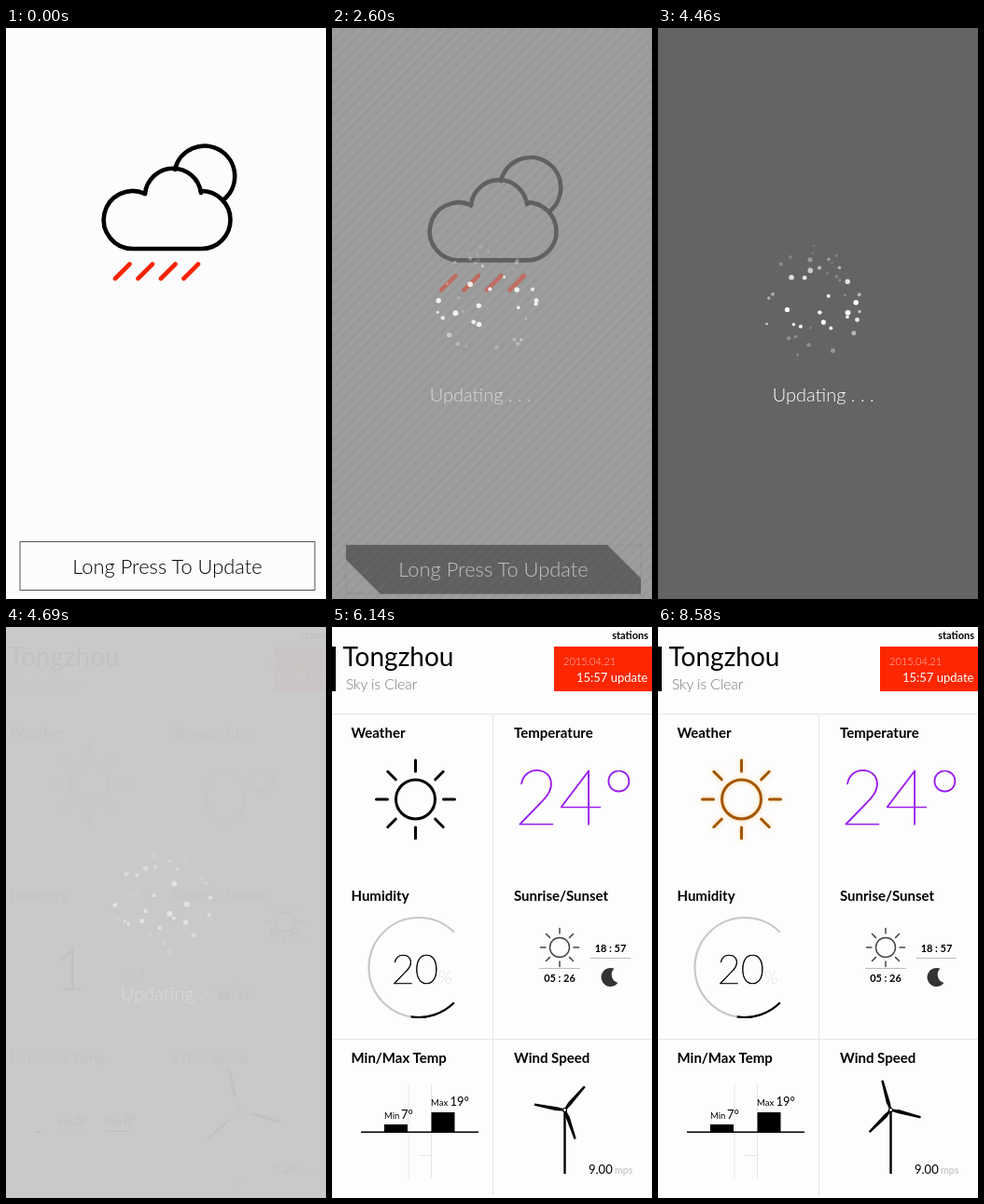
Animation, 343 px wide and 613 px high, one loop 8680 ms. Source, as an HTML page:

```html
<!DOCTYPE html>
<html lang="en">
<head>
<meta charset="utf-8">
<title>Weather update</title>
<style>
html, body { margin: 0; width: 100%; height: 100%; overflow: hidden; background: #fcfcfc; }
svg { display: block; width: 100vw; height: 100vh; font-family: Lato, "Open Sans", sans-serif; }
text { white-space: pre; }
.bold { font-weight: 700; }
.light { font-weight: 300; }
.thin { font-weight: 100; }
.line { fill: none; stroke-linecap: round; }
.rule { stroke: #e6e6e6; stroke-width: 1; }
.mid { text-anchor: middle; }
</style>
</head>
<body>
<svg viewBox="0 0 343 613">
  <defs>
    <pattern id="hatch" width="8" height="8" patternUnits="userSpaceOnUse" patternTransform="rotate(45)">
      <rect width="4" height="8"/>
    </pattern>
    <clipPath id="btnClip"><rect x="15" y="551" width="316" height="53"/></clipPath>
    <clipPath id="riseClip"><rect id="riseBox" x="215" y="300" width="60" height="66"/></clipPath>
    <clipPath id="setClip"><rect id="setBox" x="275" y="300" width="50" height="55"/></clipPath>
    <clipPath id="moonClip"><rect id="moonBox" x="275" y="355" width="50" height="60"/></clipPath>
    <g id="smallSun" class="line" stroke="#444" stroke-width="1.5"><circle r="10.5"/></g>
  </defs>

  <rect id="back" width="343" height="613"/>
  <rect id="stripes" width="343" height="613" fill="url(#hatch)"/>

  <g id="home">
    <g id="cloud" class="line" stroke="#000" stroke-width="4.6">
      <path d="M181 152A32.5 32.5 0 1 1 233 184.5"/>
      <path d="M149 178A31 31 0 1 0 136 237H210A31 31 0 0 0 209 175"/>
      <path d="M149 178A30.2 30.2 0 0 1 209 177"/>
      <path stroke="#f52300" d="M117 269l15.5-15.5M141.5 269l15.5-15.5M166 269l15.5-15.5M190.5 269l15.5-15.5"/>
    </g>
    <g id="button">
      <rect id="frame" x="15" y="551.5" width="316" height="52" fill="none" stroke="#555"/>
      <path id="band" clip-path="url(#btnClip)"/>
      <text id="press" class="light mid" x="173" y="585.5" font-size="21.9">Long Press To Update</text>
    </g>
  </g>

  <g id="loader" fill="#fff">
    <g id="dots"></g>
    <text id="updating" class="light" y="401.3" font-size="20"></text>
  </g>

  <g id="board">
    <g id="rules" class="rule">
      <path d="M0 93.5H343M172.5 93.5V610M172 442.5H343"/>
    </g>
    <path id="leftRule" class="rule" d="M0 442.5H173"/>
    <g id="head">
      <rect y="21" width="4" height="48"/>
      <text x="11.5" y="41.5" font-size="28">Tongzhou</text>
      <text class="light" x="15" y="67" font-size="15.5" fill="#777">Sky is Clear</text>
    </g>
    <text id="stations" class="bold" x="339" y="13" font-size="11" text-anchor="end">stations</text>
    <g id="panel">
      <rect id="panelBox" x="238" y="21" width="110" height="48" fill="#fc2600"/>
      <g id="panelText">
        <text class="light" x="248" y="41" font-size="11" fill="#ffc4b8">2015.04.21</text>
        <text x="262" y="59" font-size="13" fill="#fff">15:57 update</text>
      </g>
    </g>
    <g id="labels" class="bold" font-size="15">
      <text x="20.5" y="119">Weather</text><text x="195" y="119">Temperature</text>
      <text x="20.5" y="294">Humidity</text><text x="195" y="294">Sunrise/Sunset</text>
      <text x="20.5" y="468">Min/Max Temp</text><text x="195" y="468">Wind Speed</text>
    </g>

    <g id="sun" class="line" stroke-width="3"><circle r="21"/></g>
    <text id="temp" class="thin" x="195.5" y="212" font-size="82" fill="#9a1ff0" stroke="#9a1ff0" stroke-width="0.9"></text>

    <g id="dial" class="line" stroke-width="2.2" style="stroke-linecap:butt">
      <path id="ring" stroke="#c8c8c8"/><path id="arc" stroke="#000"/>
    </g>
    <g id="humid">
      <text id="humNum" class="thin" x="63.5" y="383" font-size="43.5" stroke="#000" stroke-width="0.7"></text>
      <text class="thin" x="114" y="383" font-size="19" fill="#999">%</text>
    </g>

    <g id="twilight">
      <g clip-path="url(#riseClip)"><use id="riseSun" href="#smallSun"/></g>
      <g clip-path="url(#setClip)"><use id="setSun" href="#smallSun"/></g>
      <g clip-path="url(#moonClip)">
        <path id="moon" fill="#333" d="M4-9.2A10 10 0 1 0 8 6A9 9 0 0 1 4-9.2Z"/>
      </g>
      <g id="rise">
        <path d="M222 366.5H266" stroke="#bbb"/>
        <text class="bold mid" x="244" y="381" font-size="11">05 : 26</text>
      </g>
      <g id="set">
        <path d="M277 355.5H320" stroke="#bbb"/>
        <text class="bold mid" x="298.5" y="348.5" font-size="11">18 : 57</text>
      </g>
    </g>

    <path id="guide1" class="rule" d="M82 491V592"/>
    <path id="guide2" class="rule" d="M106.5 491V592"/>
    <path id="tick" class="rule" d="M93 567.5H106"/>
    <g id="bars">
      <rect id="minBar" x="56" width="25"/><rect id="maxBar" x="106.5" width="25"/>
      <path id="base" stroke="#000" stroke-width="1.5"/>
      <g id="minText"><text x="56" font-size="9.5">Min</text><text id="minNum" x="74" font-size="13"></text></g>
      <g id="maxText"><text x="106" font-size="9.5">Max</text><text id="maxNum" x="126.5" font-size="13"></text></g>
    </g>

    <g id="wind">
      <path id="tower" stroke="#000" stroke-width="2.4"/>
      <g id="blades"></g>
      <circle cx="249.5" cy="518.5" r="2" fill="#fff" stroke="#000" stroke-width="1.2"/>
      <g id="speed">
        <text id="speedNum" x="275" y="587" font-size="13"></text>
        <text class="bold" x="303" y="587" font-size="10.5" fill="#ccc">mps</text>
      </g>
    </g>
  </g>
</svg>
<script>
const LOOP = 8680;
const el = {};
document.querySelectorAll('[id]').forEach(n => el[n.id] = n);

const clamp = x => Math.max(0, Math.min(1, x));
const span = (t, from, length) => clamp((t - from) / length);
const easeOut = (x, power = 2) => 1 - Math.pow(1 - x, power);
const set = (name, attrs) => { for (const k in attrs) el[name].setAttribute(k, attrs[k]); };
const move = (name, x, y, extra = '') => set(name, { transform: `translate(${x} ${y})${extra}` });
const show = (names, value) => names.split(' ').forEach(n => set(n, { opacity: value }));
const write = (name, value) => { if (el[name].textContent !== value) el[name].textContent = value; };

function add(parent, tag, attrs) {
  const node = document.createElementNS('http://www.w3.org/2000/svg', tag);
  for (const k in attrs) node.setAttribute(k, attrs[k]);
  return el[parent].appendChild(node);
}

// CSS "ease" curve, solved by bisection
function ease(x) {
  let lo = 0, hi = 1, s = 0.5;
  const curve = (a, b) => 3 * a * s * (1 - s) ** 2 + 3 * b * s * s * (1 - s) + s ** 3;
  for (let i = 0; i < 18; i++) {
    s = (lo + hi) / 2;
    if (curve(0.25, 0.25) < x) lo = s; else hi = s;
  }
  return curve(0.1, 1);
}

function addRays(parent, inner, outer) {
  for (let i = 0; i < 8; i++) add(parent, 'path', { d: `M${inner} 0H${outer}`, transform: `rotate(${i * 45})` });
}
addRays('sun', 30, 42);
addRays('smallSun', 15, 20.5);

const blades = [0, 120, 240].map(turn => ({
  turn,
  node: add('blades', 'path', { d: 'M0-1L9-2.4L33-1.2V1.2L9 1.6L0 1Z' })
}));

let seed = 29;
const random = () => (seed = (seed * 16807) % 2147483647) / 2147483647;
const dots = Array.from({ length: 42 }, () => ({
  height: random() * 2 - 1,
  angle: random() * Math.PI * 2,
  speed: 0.0018 + random() * 0.0012,
  size: 1.4 + random() * 1.2,
  node: add('dots', 'circle', {})
}));

function arcPath(start, sweep) {
  const at = deg => {
    const a = deg * Math.PI / 180;
    return `${93 + 53.5 * Math.cos(a)} ${365.5 + 53.5 * Math.sin(a)}`;
  };
  return `M${at(start)}A53.5 53.5 0 ${sweep > 180 ? 1 : 0} 1 ${at(start + sweep)}`;
}

function drawHome(t, out) {
  const fill = easeOut(span(t, 1630, 600));
  const half = 148 * fill, left = 147 - half, right = 147 + half;
  set('band', { d: `M${left} 551H${right}l53 53H${left + 53}Z`, opacity: fill });
  show('frame', 1 - 0.7 * fill);
  const tone = Math.round(255 * fill);
  set('press', { fill: `rgb(${tone},${tone},${tone})` });
  move('cloud', 0, 20 * out);
  move('button', 0, 6 * out);
  show('home', 1 - out);
}

function drawLoader(t, enter, leave) {
  const alpha = enter * (1 - leave);
  show('updating', alpha);
  show('dots', clamp(alpha * 1.4));
  if (!alpha) return;
  for (const d of dots) {
    const a = d.angle + d.speed * t, r = Math.sqrt(1 - d.height ** 2);
    const depth = (Math.sin(a) * r + 1) / 2;
    const y = d.height * 0.95 + 0.15 * Math.sin(a);
    d.node.setAttribute('cx', 166 + 54 * r * Math.cos(a));
    d.node.setAttribute('cy', 295 + 58 * y);
    d.node.setAttribute('r', d.size * (0.7 + 0.5 * depth));
    d.node.setAttribute('opacity', clamp((0.2 + depth) * (1.25 - Math.abs(y))));
  }
  const count = 1 + Math.floor(((t - 2600 + 775) % 930) / 310);
  write('updating', 'Updating' + ' .'.repeat(count));
  set('updating', { x: 122.7 - 47 * (1 - enter) });
}

function drawSun(t, rest) {
  const phase = ((t + 3860) % 2000) / 1000;
  const heat = phase < 1 ? ease(phase) : 1 - ease(phase - 1);
  move('sun', 89.5, 185 - 17 * rest);
  set('sun', { stroke: `rgb(${220 * heat | 0},${118 * heat | 0},0)` });
  el.sun.style.filter = heat > 0.01 ? `drop-shadow(0 0 2.5px rgba(255,165,40,${0.7 * heat}))` : 'none';
}

function drawTwilight(p, rest) {
  const riseY = 366 + 20 * rest, setY = 355 - 17 * rest;
  set('riseBox', { height: riseY - 300 });
  set('setBox', { height: setY - 300 });
  set('moonBox', { y: setY });
  move('riseSun', 244, riseY - 22 + 39 * rest);
  move('setSun', 298.5, setY - 22 + 62 * p * p);
  move('moon', 298.5, setY + 21 - 38 * rest, ` rotate(${-100 * rest})`);
  move('rise', 0, 20 * rest);
  move('set', 0, -17 * rest);
}

function drawBars(q, rest) {
  const grow = easeOut(q, 3), low = 8 * grow, high = 21 * grow;
  set('minBar', { y: 542 - low, height: low });
  set('maxBar', { y: 542 - high, height: high });
  set('base', { d: `M31 542.2H${31 + 126 * grow}` });
  move('minText', 0, 535.5 - low);
  move('maxText', 0, 535 - high);
  write('minNum', Math.round(7 * q) + '°');
  write('maxNum', Math.round(19 * q) + '°');
  show('bars', grow);
  show('guide1', clamp(q * 2 - 1));
  move('guide2', -150 * rest, 0);
  move('tick', -150 * rest, -150 * rest);
}

function drawWind(t, p, rest) {
  const foot = 587 + 12 * rest;
  set('tower', { d: `M249.5 ${foot}V${foot - 68 * p}` });
  move('blades', 249.5, 518.5, ` rotate(${-50 + 0.272 * (t - 6140) - 20 * rest})`);
  for (const b of blades) b.node.setAttribute('transform', `rotate(${b.turn}) translate(${14 * rest} 0)`);
  write('speedNum', (9 * p).toFixed(2));
  move('speed', 12 * rest, 0);
}

function drawBoard(t) {
  const q = span(t, 4675, 1000), p = easeOut(q), rest = 1 - p;
  show('board', q ? 1 : 0);
  if (!q) return;
  show('panel labels sun temp', clamp(q * 1.2));
  show('head stations twilight wind', p);
  show('dial humid leftRule guide2 tick', clamp(q * 3));
  show('rules', clamp(q * 2 - 1));
  move('head', -9 * rest, 0);
  move('stations', 16 * rest, 0);
  move('panelBox', 51 * rest, 0);
  move('panelText', 28 * rest, 0);
  move('labels', -17 * rest, 0);
  move('leftRule', -15 * rest, 0);

  drawSun(t, rest);
  write('temp', Math.round(24 * q) + '°');
  move('temp', 16 * rest, 0);

  set('ring', { d: arcPath(45 * p, 270 * p) });
  set('arc', { d: arcPath(45 * p, 54 * p) });
  write('humNum', String(Math.round(20 * p)));
  move('humid', 93, 367, ` scale(${1 + 0.4 * rest}) translate(-93 -367)`);

  drawTwilight(p, rest);
  drawBars(q, rest);
  drawWind(t, p, rest);
}

function draw(t) {
  const enter = span(t, 2200, 650), leave = span(t, 4480, 320);
  const gray = Math.round(252 - 152 * enter + 153 * leave);
  set('back', { fill: `rgb(${gray},${gray},${gray})` });
  show('stripes', 0.14 * enter * (1 - enter));
  drawHome(t, enter);
  drawLoader(t, enter, leave);
  drawBoard(t);
}

const begin = performance.now();
function frame() {
  draw((performance.now() - begin) % LOOP);
  requestAnimationFrame(frame);
}
draw(0);
requestAnimationFrame(frame);
</script>
</body>
</html>
```
